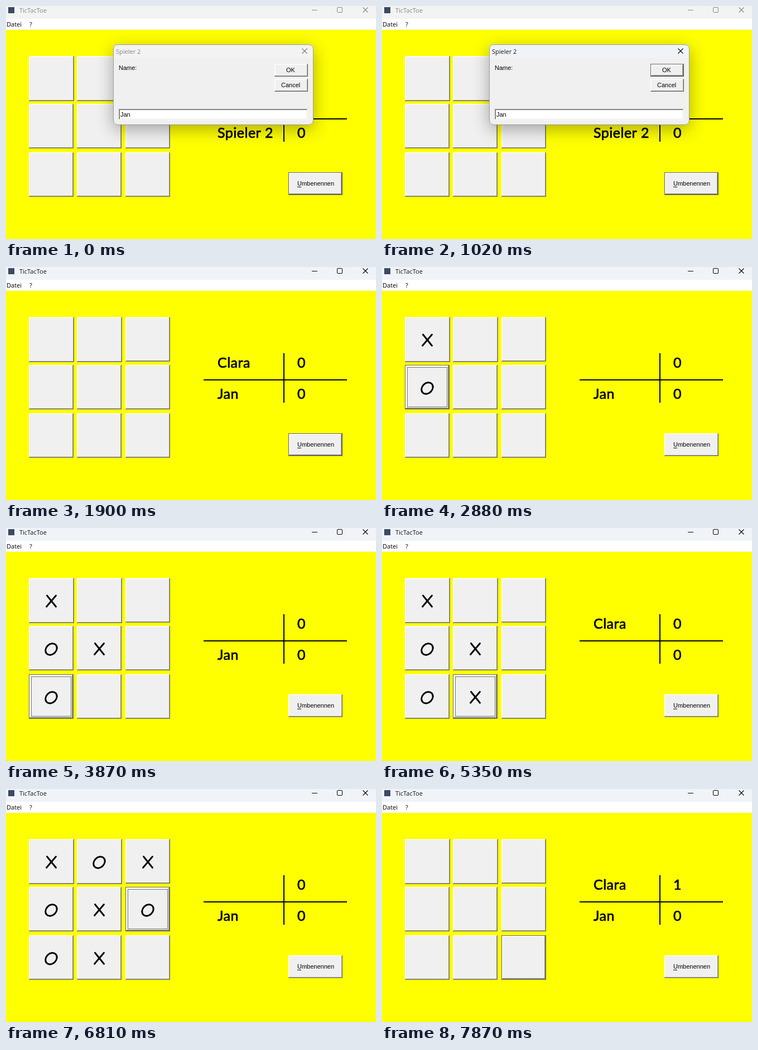
An HTML page with a canvas for the animation above (8 s loop, 663 px wide and 419 px high).

```html
<!DOCTYPE html>
<html lang="de">
<head>
<meta charset="utf-8">
<title>TicTacToe</title>
<style>
  html, body { margin: 0; width: 100%; height: 100%; overflow: hidden; background: #ff0; }
  canvas { display: block; }
</style>
</head>
<body>
<canvas id="stage" width="663" height="419"></canvas>
<script>
const LOOP = 8000;
const FACE = '#f0f0f0', FRAME = '#646464', ACTIVE = '#f0f4f9', IDLE = '#f3f3f3';
const UI = '11px "Open Sans", "Noto Sans", sans-serif';
const CLASSIC = '11px "Liberation Sans", Arial, sans-serif';
const HAND = '25px Lato, "Open Sans", sans-serif';
const PLAYERS = ['Clara', 'Jan'];
const COLS = [41, 127, 214], ROWS = [90, 176, 263];

// [cell, press time, release time]; X and O take turns
const MOVES = [
  [0, 1970, 2020], [3, 2480, 2540], [4, 3010, 3070], [6, 3670, 3740],
  [7, 4950, 5010], [1, 5680, 5750], [2, 6290, 6350], [5, 6550, 6620],
  [8, 6930, 7010]
];
const WIN = 7010;

// times at which each name is hidden or shown again, starting hidden / shown
const BLINK = [
  [1350, 1550, 1900, 2880, 3340, 3870, 4350, 4880, 5350, 5880, 6350, 6810, 7340],
  [2360, 2880, 3340, 3870, 5350, 5880, 7340, 7870]
];

// closing dialog: [start, scale, opacity]
const CLOSING = [[0, 1, 1], [1060, 0.99, 0.88], [1110, 0.975, 0.68], [1160, 0.961, 0.43], [1210, 0, 0]];
const RENAMED = 1060;

const stage = document.getElementById('stage').getContext('2d');
const layer = document.createElement('canvas');
layer.width = 663;
layer.height = 419;
const overlay = layer.getContext('2d');

function rect(c, x, y, w, h, color) {
  c.fillStyle = color;
  c.fillRect(x, y, w, h);
}

function frame(c, x, y, w, h, topLeft, bottomRight) {
  rect(c, x, y, w, 1, topLeft);
  rect(c, x, y, 1, h, topLeft);
  rect(c, x, y + h - 1, w, 1, bottomRight);
  rect(c, x + w - 1, y, 1, h, bottomRight);
}

function text(c, s, x, y, font, color = '#000') {
  c.font = font;
  c.fillStyle = color;
  c.fillText(s, x, y);
}

function handText(s, x, y) {
  const c = stage;
  c.save();
  c.letterSpacing = '0.5px';
  c.lineJoin = 'round';
  c.lineWidth = 0.7;
  c.strokeStyle = '#000';
  text(c, s, x, y, HAND);
  c.strokeText(s, x, y);
  c.restore();
}

function line(c, x1, y1, x2, y2) {
  c.beginPath();
  c.moveTo(x1, y1);
  c.lineTo(x2, y2);
  c.stroke();
}

function cross(c, x, y, size, color) {
  c.strokeStyle = color;
  c.lineWidth = 1.1;
  line(c, x, y, x + size, y + size);
  line(c, x + size, y, x, y + size);
}

function button(c, x, y, w, h, { strong = false, focus = false, down = false } = {}) {
  rect(c, x, y, w, h, FACE);
  let i = 0;
  if (strong) {
    frame(c, x, y, w, h, FRAME, FRAME);
    i = 1;
  }
  if (down) {
    frame(c, x + 1, y + 1, w - 2, h - 2, '#a0a0a0', '#a0a0a0');
  } else {
    frame(c, x + i, y + i, w - 2 * i, h - 2 * i, '#fff', '#696969');
    frame(c, x + i + 1, y + i + 1, w - 2 * i - 2, h - 2 * i - 2, '#f7f7f7', '#a0a0a0');
  }
  if (focus) {
    c.save();
    c.strokeStyle = '#000';
    c.lineWidth = 1;
    c.setLineDash([1, 1]);
    c.strokeRect(x + 4.5, y + 4.5, w - 9, h - 9);
    c.restore();
  }
}

function mark(isX, x, y) {
  const c = stage;
  c.strokeStyle = '#000';
  c.lineWidth = 2.9;
  c.lineCap = 'round';
  if (isX) {
    line(c, x + 32.5, y + 31.5, x + 48.5, y + 51.5);
    line(c, x + 48.5, y + 31.5, x + 31.5, y + 51.5);
  } else {
    c.beginPath();
    c.ellipse(x + 40, y + 42, 11.4, 9, -Math.PI / 4, 0, 7);
    c.stroke();
  }
  c.lineCap = 'butt';
}

function drawWindow(active) {
  const c = stage, ink = active ? '#000' : '#868686';
  rect(c, 0, 0, 663, 419, '#ff0');
  rect(c, 0, 0, 663, 23, active ? ACTIVE : IDLE);
  rect(c, 0, 23, 663, 19, '#fff');
  rect(c, 0, 42, 663, 1, '#f0f0f0');
  rect(c, 4, 2, 11, 11, '#3c4a63');
  text(c, 'TicTacToe', 24, 12, UI, active ? '#111' : '#868686');
  text(c, 'Datei', 1, 37, UI);
  text(c, '?', 42, 37, UI);
  rect(c, 548, 7, 10, 1, ink);
  c.strokeStyle = ink;
  c.lineWidth = 1;
  c.beginPath();
  c.roundRect(593.5, 2.5, 9, 9, 1.5);
  c.stroke();
  cross(c, 639.5, 2.5, 9, ink);
}

function drawBoard(t) {
  const made = MOVES.filter(m => t >= m[1]);
  const last = made[made.length - 1];
  const won = t >= WIN;
  for (let i = 0; i < 9; i++) {
    const col = i % 3, row = (i - col) / 3;
    const size = row === 0 && col < 2 ? 81 : 80;
    const current = !!last && last[0] === i;
    button(stage, COLS[col], ROWS[row], size, size, {
      strong: current,
      focus: current && !won,
      down: current && t < last[2]
    });
  }
  if (won) return;
  made.forEach(([cell, , done], n) => {
    if (t >= done) mark(n % 2 === 0, COLS[cell % 3], ROWS[Math.floor(cell / 3)]);
  });
}

function drawScore(t) {
  const toggles = BLINK.map(list => list.filter(time => t >= time).length);
  rect(stage, 354, 202, 257, 2, '#000');
  rect(stage, 497, 155, 2, 89, '#000');
  if (toggles[0] % 2 === 1) handText(PLAYERS[0], 379, 181);
  if (toggles[1] % 2 === 0) handText(t < RENAMED ? 'Spieler 2' : PLAYERS[1], 379, 237);
  handText(t < WIN ? '0' : '1', 522, 181);
  handText('0', 522, 237);
}

function drawRename(t) {
  button(stage, 506, 299, 97, 41, {
    strong: t < MOVES[0][1],
    focus: t >= RENAMED && t < 1900
  });
  text(stage, 'Umbenennen', 522, 323, CLASSIC);
  rect(stage, 522, 325, 7, 1, '#000');
}

function drawDialog(t) {
  const [, scale, alpha] = CLOSING.filter(s => t >= s[0]).pop();
  if (!alpha) return;
  const c = overlay, x = 192, y = 69, w = 359, h = 145;
  const active = t >= 70;
  c.clearRect(0, 0, 663, 419);

  c.save();
  c.shadowColor = 'rgba(0,0,0,0.32)';
  c.shadowBlur = 30;
  c.shadowOffsetY = 8;
  c.fillStyle = FACE;
  c.beginPath();
  c.roundRect(x, y, w, h, 8);
  c.fill();
  c.restore();

  c.save();
  c.clip();
  rect(c, x, y, w, 25, active ? ACTIVE : IDLE);
  c.restore();
  c.strokeStyle = 'rgba(90,90,80,0.55)';
  c.lineWidth = 1;
  c.beginPath();
  c.roundRect(x + 0.5, y + 0.5, w - 1, h - 1, 7.5);
  c.stroke();

  text(c, 'Spieler 2', 197, 86, UI, active ? '#111' : '#868686');
  cross(c, 530.5, 76.5, 9, active ? '#000' : '#777');
  text(c, 'Name:', 202, 115, CLASSIC);
  button(c, 481, 104, 60, 23, { strong: t >= 950 });
  text(c, 'OK', 502, 119, CLASSIC);
  button(c, 481, 131, 60, 23);
  text(c, 'Cancel', 493, 146, CLASSIC);
  rect(c, 202, 185, 339, 20, '#fff');
  frame(c, 202, 185, 339, 20, '#a0a0a0', '#fff');
  frame(c, 203, 186, 337, 18, '#696969', '#e3e3e3');
  text(c, PLAYERS[1], 205, 199, CLASSIC);

  const shift = (1 - scale) / 0.039;
  stage.save();
  stage.globalAlpha = alpha;
  stage.translate(x + 5 * shift, y + shift);
  stage.scale(scale, scale);
  stage.drawImage(layer, -x, -y);
  stage.restore();
}

function draw(t) {
  drawWindow(t >= RENAMED);
  drawBoard(t);
  drawScore(t);
  drawRename(t);
  drawDialog(t);
}

const start = performance.now();
function tick() {
  draw((performance.now() - start) % LOOP);
  requestAnimationFrame(tick);
}
tick();
</script>
</body>
</html>
```
